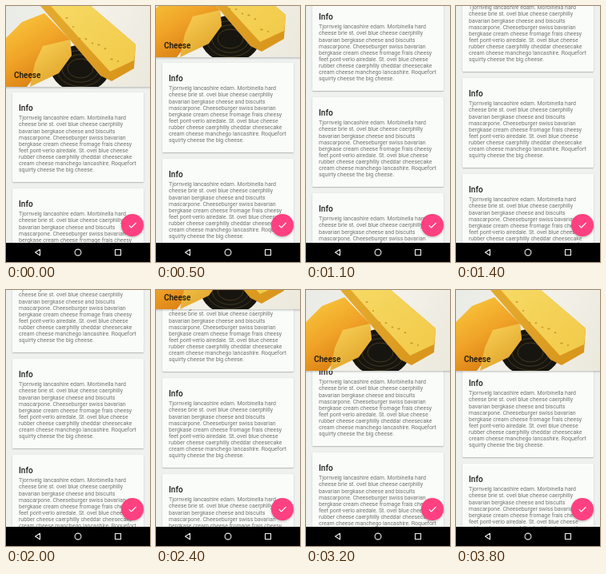
Recreate the animation shown at these times as an HTML page with a canvas. Size 180x320 px, loop 3900 ms.

```html
<!DOCTYPE html>
<html lang="en">
<head>
<meta charset="utf-8">
<title>Cheese</title>
<style>
html, body { margin: 0; width: 100%; height: 100%; overflow: hidden; background: #eef1ee; }
canvas { display: block; width: 180px; height: 320px; }
</style>
</head>
<body>
<canvas id="stage"></canvas>
<script>
const W = 180, H = 320, LOOP = 3900, STEP = 100;
const HEADER = 101, TRAVEL = 142, RETURN = 131, TURN = 2000;
const DOWN_MS = 1600, UP_MS = 1550;
const PITCH = 120, LEADING = 8.15;
const FONT = 'Roboto, "Noto Sans", sans-serif';
const LINES = [
  'Tjornvelg lancashire edam. Morbinella hard',
  'cheese brie st. ovel blue cheese caerphilly',
  'bavarian bergkase cheese and biscuits',
  'mascarpone. Cheeseburger swiss bavarian',
  'bergkase cream cheese fromage frais cheesy',
  'feet pont-verlo airedale. St. ovel blue cheese',
  'rubber cheese caerphilly cheddar cheesecake',
  'cream cheese manchego lancashire. Roquefort',
  'squirty cheese the big cheese.'
];

const canvas = document.getElementById('stage');
const ctx = canvas.getContext('2d');
const dpr = window.devicePixelRatio || 1;
canvas.width = W * dpr;
canvas.height = H * dpr;

// Smooth start and stop, slightly front-loaded
function ease(u) {
  const v = 1 - Math.pow(1 - Math.min(u, 1), 1.08);
  return v * v * (3 - 2 * v);
}

// The header moves first in either direction, then the list scrolls.
function pose(t) {
  const down = t < TURN;
  const drag = down ? TRAVEL * ease(t / DOWN_MS) : RETURN * ease((t - TURN) / UP_MS);
  const moved = Math.min(drag, HEADER);
  return {
    header: Math.round(down ? moved : HEADER - moved),
    list: Math.round(down ? drag : TRAVEL - drag)
  };
}

function random(seed) {
  return () => (seed = seed * 16807 % 2147483647) / 2147483647;
}

function text(str, x, y, size, weight, color) {
  ctx.font = `${weight} ${size}px ${FONT}`;
  ctx.fillStyle = color;
  ctx.fillText(str, x, y);
}

function shape(path, fill) {
  ctx.fillStyle = fill;
  ctx.fill(new Path2D(path));
}

function oval(x, y, rx, ry, fill) {
  ctx.beginPath();
  ctx.ellipse(x, y, rx, ry, 0, 0, Math.PI * 2);
  ctx.fillStyle = fill;
  ctx.fill();
}

function ring(x, y, rx, ry, color, width) {
  ctx.beginPath();
  ctx.ellipse(x, y, rx, ry, 0, 0, Math.PI * 2);
  ctx.strokeStyle = color;
  ctx.lineWidth = width;
  ctx.stroke();
}

function blend(x0, y0, x1, y1, ...colors) {
  const g = ctx.createLinearGradient(x0, y0, x1, y1);
  colors.forEach((c, i) => g.addColorStop(i / (colors.length - 1), c));
  return g;
}

function shadow(color, blur, y) {
  ctx.shadowColor = color;
  ctx.shadowBlur = blur * dpr;
  ctx.shadowOffsetY = y * dpr;
}

function card(y) {
  ctx.save();
  shadow('rgba(0,0,0,.3)', 1.5, .7);
  ctx.fillStyle = '#fafcf9';
  ctx.beginPath();
  ctx.roundRect(8, y, 164, 112, 1);
  ctx.fill();
  ctx.restore();
  text('Info', 16, y + 23, 10, 500, '#1c1c1c');
  LINES.forEach((line, i) => text(line, 16, y + 34.2 + i * LEADING, 7, 400, '#717371'));
}

function photo() {
  ctx.fillStyle = blend(0, 0, 180, 101, '#e9ebe6', '#f3f2ea', '#ebe8dc');
  ctx.fillRect(0, 0, W, HEADER);

  // Dark plate
  oval(93, 78, 37, 29, '#17150f');
  for (let r = 16; r < 32; r += 7) ring(93, 78, r, r * .75, '#5a4a28', .7);

  // Left piece: rind, then cut face
  shape('M0 40 L20 20 L48 9 L80 42 L82 62 L44 78 L26 101 H0 Z',
    blend(5, 20, 50, 95, '#f8c33a', '#f0a428', '#d97d12'));
  shape('M46 50 L80 42 L82 62 L66 84 L30 101 L36 72 Z',
    blend(40, 50, 70, 95, '#f6cc50', '#e0a32c'));

  // Large piece: rind, then top face
  shape('M43 0 H106 L162 48 L160 78 L132 94 L118 87 L78 40 Z',
    blend(60, 20, 140, 94, '#e3a92c', '#d9961c'));
  shape('M56 0 H106 L162 48 L160 68 L130 82 L88 36 Z',
    blend(70, 0, 150, 80, '#f6d862', '#f2cb4a'));
  const rnd = random(11);
  for (let i = 0; i < 9; i++) {
    const x = 76 + i * 8;
    oval(x, x * .75 - 42 + rnd() * 16, 1 + rnd(), 1, '#c99a2c');
  }
}

function header(offset) {
  if (offset >= HEADER) return;
  ctx.save();
  ctx.translate(0, -offset);
  ctx.fillStyle = blend(0, HEADER, 0, HEADER + 3, 'rgba(0,0,0,.2)', 'rgba(0,0,0,0)');
  ctx.fillRect(0, HEADER, W, 3);
  ctx.beginPath();
  ctx.rect(0, 0, W, HEADER);
  ctx.clip();
  photo();
  text('Cheese', 10, 90, 10, 500, '#15130f');
  ctx.restore();
}

function button() {
  ctx.save();
  shadow('rgba(0,0,0,.3)', 3, 1.2);
  oval(158, 274, 14, 14, '#ff4081');
  ctx.restore();
  ctx.strokeStyle = '#fff';
  ctx.lineWidth = 1.1;
  ctx.stroke(new Path2D('M153.8 274.2 l2.8 2.8 l6 -6'));
}

function navBar() {
  ctx.fillStyle = '#000';
  ctx.fillRect(0, 296, W, 24);
  ring(90, 308, 3.9, 3.9, '#eee', 1.1);
  ctx.lineJoin = 'round';
  ctx.stroke(new Path2D('M42.5 304.2 L36.5 308 L42.5 311.8 Z'));
  ctx.strokeRect(136.5, 304.5, 7, 7);
}

function draw(t) {
  const p = pose(t);
  ctx.setTransform(dpr, 0, 0, dpr, 0, 0);
  ctx.fillStyle = '#eef1ee';
  ctx.fillRect(0, 0, W, H);
  for (let i = 0; i < 3; i++) card(108 + i * PITCH - p.list);
  header(p.header);
  button();
  navBar();
}

const start = performance.now();
function tick() {
  const t = (performance.now() - start) % LOOP;
  draw(Math.floor(t / STEP) * STEP);
  requestAnimationFrame(tick);
}
tick();
</script>
</body>
</html>
```
